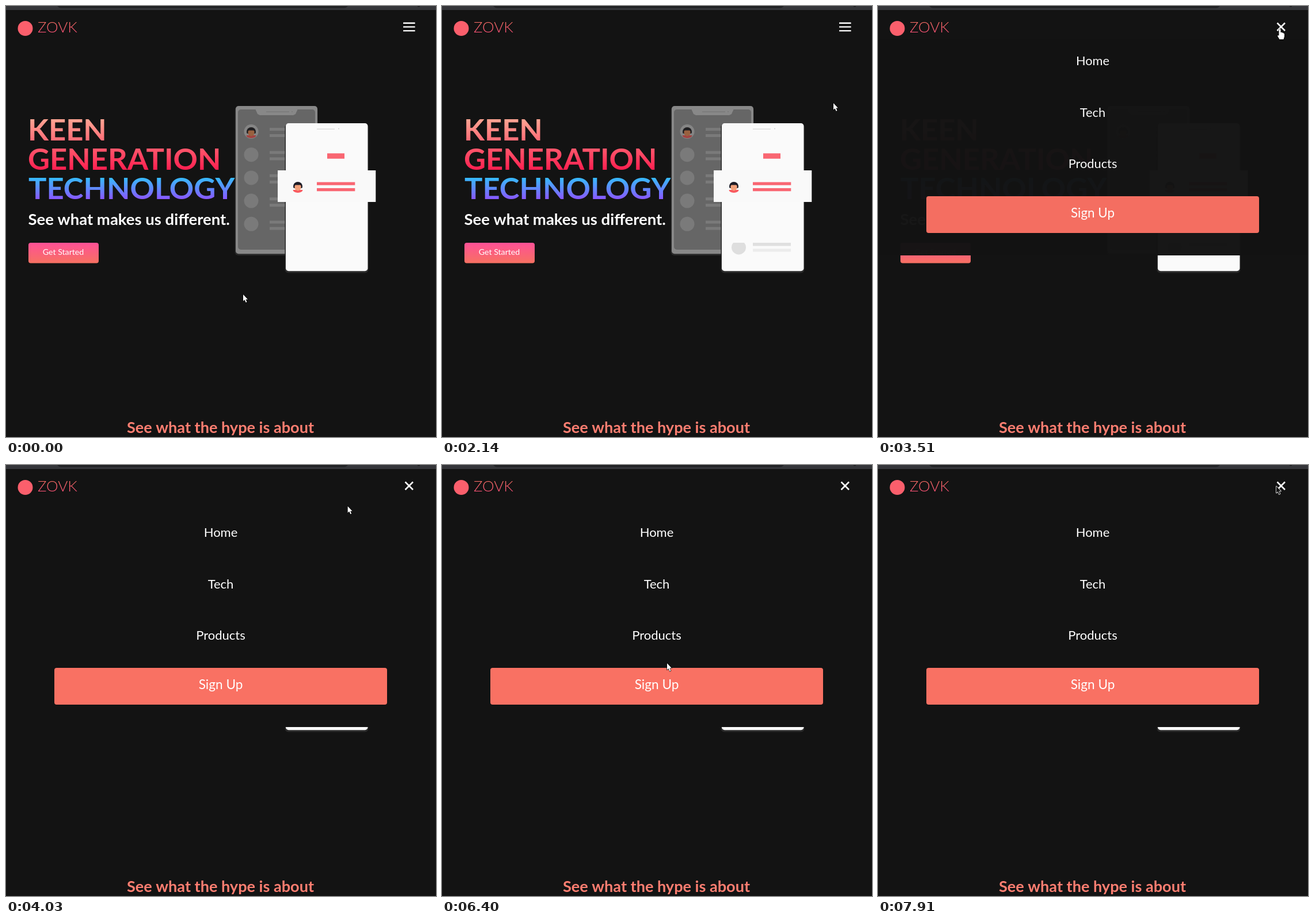
Recreate the animation shown at these times as an HTML page with a canvas. Size 747x750 px, loop 8000 ms.

```html
<!DOCTYPE html>
<html lang="en">
<head>
<meta charset="utf-8">
<title>Landing page menu</title>
<style>
html, body { margin: 0; width: 100%; height: 100%; overflow: hidden; background: #131313; }
canvas { display: block; }
</style>
</head>
<body>
<canvas id="stage" width="747" height="750"></canvas>
<script>
const ctx = document.getElementById('stage').getContext('2d');
const LOOP = 8000, STEP = 120;
const BG = '#131313', CORAL = '#f97163', BLUE = '#543cf5';
const ARROW = 0, HAND = 1, HAND_TINT = 2, ARROW_DARK = 3;

// Pointer glides: start, steps, end x, end y, shape on arrival
const glides = [
  [0, 1, 412, 502, ARROW], [120, 1, 410, 502, ARROW], [270, 3, 204, 458, ARROW],
  [660, 3, 148, 430, HAND], [1300, 2, 251, 473, ARROW], [1570, 1, 384, 508, ARROW],
  [1720, 1, 524, 484, ARROW], [1870, 1, 616, 403, ARROW], [2020, 1, 652, 280, ARROW],
  [2140, 1, 680, 169, ARROW], [2260, 2, 686, 66, ARROW], [2530, 1, 698, 40, HAND],
  [3240, 1, 698, 39, ARROW], [3510, 1, 698, 40, HAND], [3880, 1, 693, 46, ARROW],
  [4030, 3, 395, 123, HAND], [4820, 2, 395, 202, ARROW], [5090, 1, 391, 212, HAND],
  [5460, 2, 392, 262, ARROW], [5730, 2, 388, 301, HAND], [6250, 1, 389, 306, HAND],
  [6400, 1, 391, 345, ARROW], [6520, 1, 394, 386, HAND], [6670, 1, 394, 386, HAND_TINT],
  [7250, 3, 395, 122, HAND], [7640, 2, 690, 51, ARROW], [7910, 1, 692, 37, ARROW_DARK]
];

// Stepped values: time, then value(s) held from there on
const startFill = [[0, 0], [780, .35], [900, .96], [1050, 1], [1300, .9], [1420, .25], [1570, 0]];
const signMix = [[0, 0], [6520, .5], [6670, 1], [7250, .6], [7370, .2], [7490, 0]];
const menuPose = [[3390, -133, .85, 21.2], [3510, -22, .982, 21.8], [3630, 0, 1, 22]];
const links = [
  ['Home', 118, [[4270, 4820], [7490, 7640]]],
  ['Tech', 208, [[5090, 5460]]],
  ['Products', 297, [[5730, 6400]]]
];

const held = (list, t) => list.filter(k => k[0] <= t).pop();

function rect(x, y, w, h, fill, r = 0) {
  ctx.fillStyle = fill;
  ctx.beginPath();
  ctx.roundRect(x, y, w, h, r);
  ctx.fill();
}

function disc(x, y, r, fill, from = 0, to = Math.PI * 2) {
  ctx.fillStyle = fill;
  ctx.beginPath();
  ctx.arc(x, y, r, from, to);
  ctx.fill();
}

function poly(points, fill) {
  ctx.fillStyle = fill;
  ctx.beginPath();
  points.forEach(([x, y]) => ctx.lineTo(x, y));
  ctx.closePath();
  ctx.fill();
}

function text(str, x, y, size, weight, fill, align = 'left') {
  ctx.font = `${weight} ${size}px Lato, sans-serif`;
  ctx.textAlign = align;
  ctx.fillStyle = fill;
  ctx.fillText(str, x, y);
}

function fade(y0, y1, top, bottom) {
  const g = ctx.createLinearGradient(0, y0, 0, y1);
  g.addColorStop(0, top);
  g.addColorStop(1, bottom);
  return g;
}

function bars(x, y, w, h, gap, fill) {
  rect(x, y, w, h, fill);
  rect(x, y + gap, w, h, fill);
}

function avatar(x, y, hair, skin, shirt) {
  disc(x, y, 8, hair, Math.PI, 0);
  rect(x - 8, y - 1, 16, 4, hair, 2);
  rect(x - 5.5, y - 2.5, 11, 9.5, skin, [2, 2, 5, 5]);
  ctx.fillStyle = shirt;
  ctx.beginPath();
  ctx.ellipse(x, y + 6, 8.5, 5, 0, 0, Math.PI);
  ctx.fill();
  rect(x - 3, y + 4, 6, 3.5, skin, [0, 0, 3, 3]);
}

function backPhone() {
  rect(397.5, 175, 144, 259, '#292929', 6);
  rect(399, 174, 142, 257.3, '#888888', 5);
  rect(403, 180, 134, 244, '#666666', 5);
  poly([[433, 179], [507, 179], [503, 188], [499, 190], [441, 190], [437, 188]], '#888888');
  rect(452, 183.5, 40, 1.2, '#777777');
  disc(497, 184, 1, '#777777');
  for (let i = 0; i < 5; i++) {
    disc(426, 218.5 + i * 40.2, 12.5, i ? '#7a7a7a' : '#858585');
    bars(458, 212 + i * 40.4, 30, 5, 11, '#7a7a7a');
  }
  avatar(426, 219, '#1f1e20', '#99613f', '#a34341');
}

function frontPhone(t) {
  rect(484.5, 205, 145, 259.5, '#2b2b2b', 6);
  rect(486, 204, 142.5, 257.3, '#fafafa', 5);
  rect(472, 286, 170.3, 55, '#f9f9f9');
  rect(540, 213.5, 31, 1.3, '#d8d8d8');
  disc(578, 213.5, .9, '#cccccc');
  rect(558, 256.4, 30, 9.3, '#f96672');
  bars(540, 306.5, 66.3, 5.2, 10.6, '#f96672');
  avatar(507, 314, '#1d1c26', '#f3a17a', '#f9595f');
  if (t >= 1720) {
    ctx.save();
    ctx.beginPath();
    ctx.rect(486, 412, 142, 40);
    ctx.clip();
    disc(515.5, 420, 12.5, '#dedede');
    ctx.restore();
  }
  if (t >= 1870) {
    rect(540, 412, 66, 5.5, '#dfdfdf');
    rect(540, 422.5, 66, 5, '#ececec');
  }
}

function page(t) {
  rect(0, 0, 747, 750, BG);
  const warm = fade(189, 300, '#ffb199', '#ff0844');
  text('KEEN', 38, 234, 52.5, 700, warm);
  text('GENERATION', 38, 285, 52.5, 700, warm);
  text('TECHNOLOGY', 39, 336, 52.5, 700, fade(290, 356, '#21d4fd', '#b721ff'));
  text('See what makes us different.', 38.5, 381, 27.5, 700, '#ffffff');

  rect(39, 412, 122, 35.5, fade(412, 447, '#fe5196', '#f77062'), 4);
  const fill = held(startFill, t)[1];
  if (fill) rect(39, 412, 122 * fill, 35.5, BLUE, 4);
  text('Get Started', 99.5, 433, 14.2, 400, '#ffffff', 'center');

  backPhone();
  frontPhone(t);
  text('See what the hype is about', 372.5, 743, 27.1, 700, '#ff7e71', 'center');
}

function header(t) {
  disc(33.5, 39, 13, '#fb5f6c');
  text('ZOVK', 55, 46, 26, 300, fade(26, 47, '#f77062', '#fe5178'));
  if (t < 3240) {
    for (let i = 0; i < 3; i++) rect(690, 28.5 + i * 6.7, 20.6, 2.4, '#ffffff', .5);
    return;
  }
  ctx.strokeStyle = '#ffffff';
  ctx.lineWidth = 2.6;
  ctx.beginPath();
  ctx.moveTo(693.5, 29.5);
  ctx.lineTo(707, 43);
  ctx.moveTo(707, 29.5);
  ctx.lineTo(693.5, 43);
  ctx.stroke();
}

function menu(t) {
  const pose = held(menuPose, t);
  if (!pose) return;
  const [, shift, alpha, size] = pose;
  ctx.save();
  ctx.translate(0, shift);
  ctx.globalAlpha = alpha;
  rect(0, 80, 747, 376, BG);
  for (const [label, y, hot] of links) {
    const on = hot.some(([a, b]) => t >= a && t < b);
    text(label, 373, y + 7, size, 400, on ? CORAL : '#ffffff', 'center');
  }
  const m = held(signMix, t)[1];
  const mix = (a, b) => Math.round(a + (b - a) * m);
  rect(84, 353, 578, 64, `rgb(${mix(249, 84)},${mix(113, 60)},${mix(99, 245)})`, 4);
  text('Sign Up', 373, 390, size + .6, 400, '#ffffff', 'center');
  ctx.restore();
}

function browserEdge() {
  rect(0, 0, 747, 7, '#35363a');
  rect(88, -12, 507, 15.5, '#202124', 8);
  disc(717, -1, 2.5, '#1b1b1d');
}

function pointerAt(t) {
  const i = glides.findLastIndex(g => g[0] <= t);
  const [start, n, x, y, shape] = glides[i];
  const [, , px, py] = glides[Math.max(0, i - 1)];
  const k = Math.min(n, Math.floor((t - start) / STEP) + 1);
  return [px + (x - px) * k / n, py + (y - py) * k / n, k === n ? shape : ARROW];
}

function pointer(t) {
  const [x, y, shape] = pointerAt(t);
  ctx.save();
  ctx.translate(x, y);
  ctx.lineJoin = 'round';
  let path;
  if (shape === HAND || shape === HAND_TINT) {
    path = new Path2D('M-1.5 1Q0 -1 1.5 1V6L3 5.6L4.2 6.6L5.6 6.4L6.6 7.5Q8 7.2 8 9V13L6.5 18H-.5L-3.8 12.5Q-4 10 -1.5 11.5Z');
    ctx.fillStyle = shape === HAND ? '#ffffff' : '#c2bd1c';
  } else {
    path = new Path2D('M0 0V11.6L2.6 9.2L4.7 13.9L6.5 13.1L4.5 8.5H8Z');
    ctx.fillStyle = shape === ARROW ? '#ffffff' : BG;
  }
  ctx.strokeStyle = shape === ARROW_DARK ? '#f0f0f0' : '#000000';
  ctx.lineWidth = shape === ARROW_DARK ? 1.6 : 1.2;
  ctx.stroke(path);
  ctx.fill(path);
  ctx.restore();
}

const begin = performance.now();
function draw() {
  const t = Math.max(0, performance.now() - begin) % LOOP;
  page(t);
  header(t);
  menu(t);
  browserEdge();
  pointer(t);
  requestAnimationFrame(draw);
}
draw();
</script>
</body>
</html>
```
